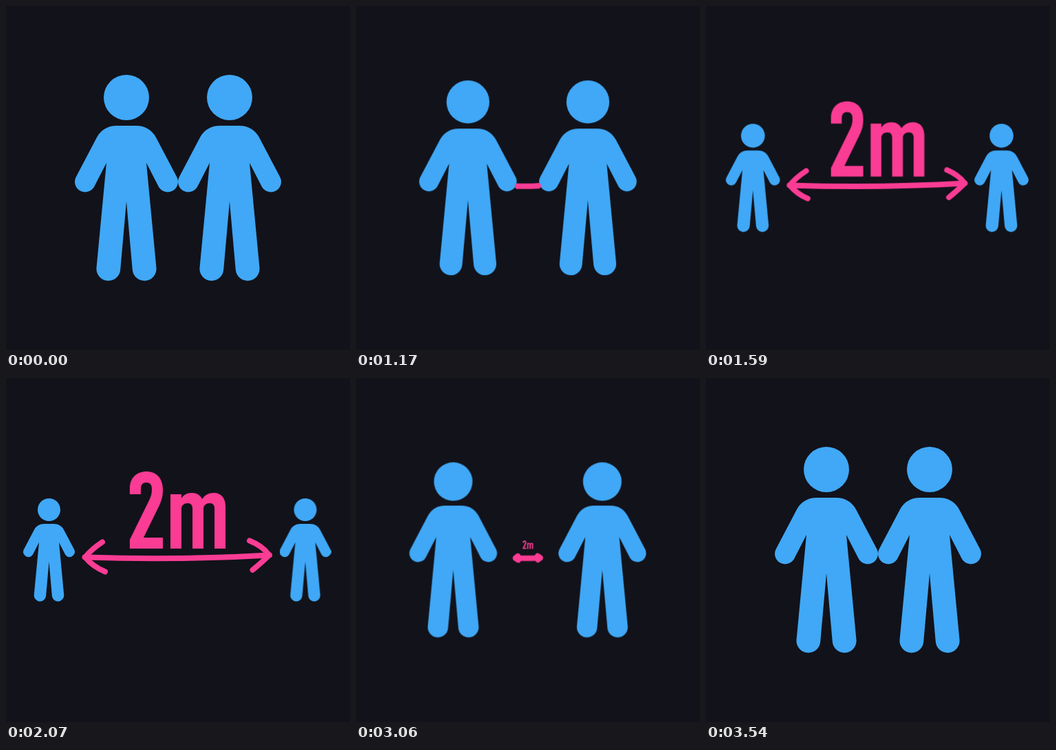
Animation of 500x500 px, one loop 3660 ms. Source, as an HTML page:

```html
<!DOCTYPE html>
<html lang="en">
<head>
<meta charset="utf-8">
<title>Keep your distance</title>
<style>
  @property --k { syntax: "<number>"; inherits: true; initial-value: 1; }

  :root { --loop: 3660ms; }
  html, body { margin: 0; width: 100%; height: 100%; overflow: hidden; background: #12121a; }
  svg { display: block; width: 100%; height: 100%; }

  .person { fill: #40a8f6; animation: part var(--loop) linear infinite; }
  .left { --dx: -112.5px; transform-origin: 175px 250px; }
  .right { --dx: 110px; transform-origin: 325px 250px; }

  /* The stroke keeps its weight while the arrow grows. */
  .arrow {
    fill: none; stroke: #fa3c94; stroke-linecap: round;
    stroke-width: calc(8px / var(--k));
    transform: scale(var(--k)); transform-origin: 250px 262px;
    animation: stretch var(--loop) linear infinite, show var(--loop) step-end infinite;
  }
  .heads { animation: heads var(--loop) linear infinite; }
  .label { fill: #fa3c94; transform-origin: 250px 248.5px; animation: pop var(--loop) linear infinite; }

  /* Outward moves ease in and out as a cubic, the way back as a quintic, each in two halves. */
  @keyframes part {
    0% { transform: translateX(0) scale(1); }
    24.59% { transform: translateX(0) scale(1); animation-timing-function: cubic-bezier(.333, 0, .667, 0); }
    36.885% { transform: translateX(calc(var(--dx) * .5)) scale(.75); animation-timing-function: cubic-bezier(.333, 1, .667, 1); }
    49.18% { transform: translateX(var(--dx)) scale(.5); animation-timing-function: linear; }
    68.716% { transform: translateX(var(--dx)) scale(.5); animation-timing-function: cubic-bezier(.64, 0, .78, 0); }
    82.281% { transform: translateX(calc(var(--dx) * .5)) scale(.75); animation-timing-function: cubic-bezier(.22, 1, .36, 1); }
    95.847%, 100% { transform: translateX(0) scale(1); }
  }
  @keyframes stretch {
    0% { --k: .002; }
    24.59% { --k: .002; animation-timing-function: cubic-bezier(.333, 0, .667, 0); }
    36.885% { --k: .5; animation-timing-function: cubic-bezier(.333, 1, .667, 1); }
    49.18% { --k: 1; animation-timing-function: linear; }
    66.97% { --k: 1; animation-timing-function: cubic-bezier(.64, 0, .78, 0); }
    80.49% { --k: .5; animation-timing-function: cubic-bezier(.22, 1, .36, 1); }
    94.02%, 100% { --k: .002; }
  }
  @keyframes show {
    0% { opacity: 0; }
    25.4% { opacity: 1; }
    94.02%, 100% { opacity: 0; }
  }
  @keyframes heads {
    0% { stroke-dasharray: 0 100; }
    38.2% { stroke-dasharray: 0 100; animation-timing-function: cubic-bezier(.333, 1, .667, 1); }
    52%, 100% { stroke-dasharray: 45 100; }
  }
  @keyframes pop {
    0% { transform: scale(0); }
    32.787% { transform: scale(0); animation-timing-function: cubic-bezier(.333, 1.377, .667, 1); }
    57.377% { transform: scale(1); animation-timing-function: linear; }
    68.306% { transform: scale(1); animation-timing-function: cubic-bezier(.64, 0, .78, 0); }
    80.464% { transform: scale(.5); animation-timing-function: cubic-bezier(.22, 1, .36, 1); }
    92.623%, 100% { transform: scale(0); }
  }
</style>
</head>
<body>
<svg viewBox="0 0 500 500" role="img" aria-label="Two people move 2m apart">
  <defs>
    <g id="figure">
      <circle cx="175" cy="133" r="33"/>
      <path d="M161 174H189C202 174 212 180 218 191L248.5 249A15 15 0 0 1 222 263L204 228
               L218.5 380.5A17.4 17.4 0 0 1 183.8 383.5L175 284L166.2 383.5A17.4 17.4 0 0 1 131.5 380.5
               L146 228L128 263A15 15 0 0 1 101.5 249L132 191C138 180 148 174 161 174Z"/>
    </g>
  </defs>

  <g class="person left"><use href="#figure"/></g>
  <g class="person right"><use href="#figure" x="150"/></g>

  <g class="arrow">
    <path d="M114.5 260.5Q250 265 383 257.5"/>
    <path class="heads" d="M115 260.5Q124 249 140 238.5M115 260.5Q126 274 144 281.5
                           M382.5 257.5Q373 244 354 236.5M382.5 257.5Q373 267 358.5 279"/>
  </g>

  <!-- Condensed lettering: 2, then m -->
  <g class="label" aria-label="2m">
    <path d="M180 169V161C180 145 190 136 204 136C219 136 228 146 228 162C228 173 226 178 223 185
             L200 232H228V248H180V235L208 178C211 172 212 168 212 161C212 155 209 152 204 152
             C199 152 196 155 196 161V169Z"/>
    <path d="M239 169H255V175C258 170 263 167 270 167C277 167 282 170 285 176C289 170 295 167 302 167
             C313 167 319 175 319 187V248H303V190C303 185 301 182 296 182C291 182 287 185 287 190
             V248H271V190C271 185 269 182 264 182C259 182 255 185 255 190V248H239Z"/>
  </g>
</svg>
</body>
</html>
```
